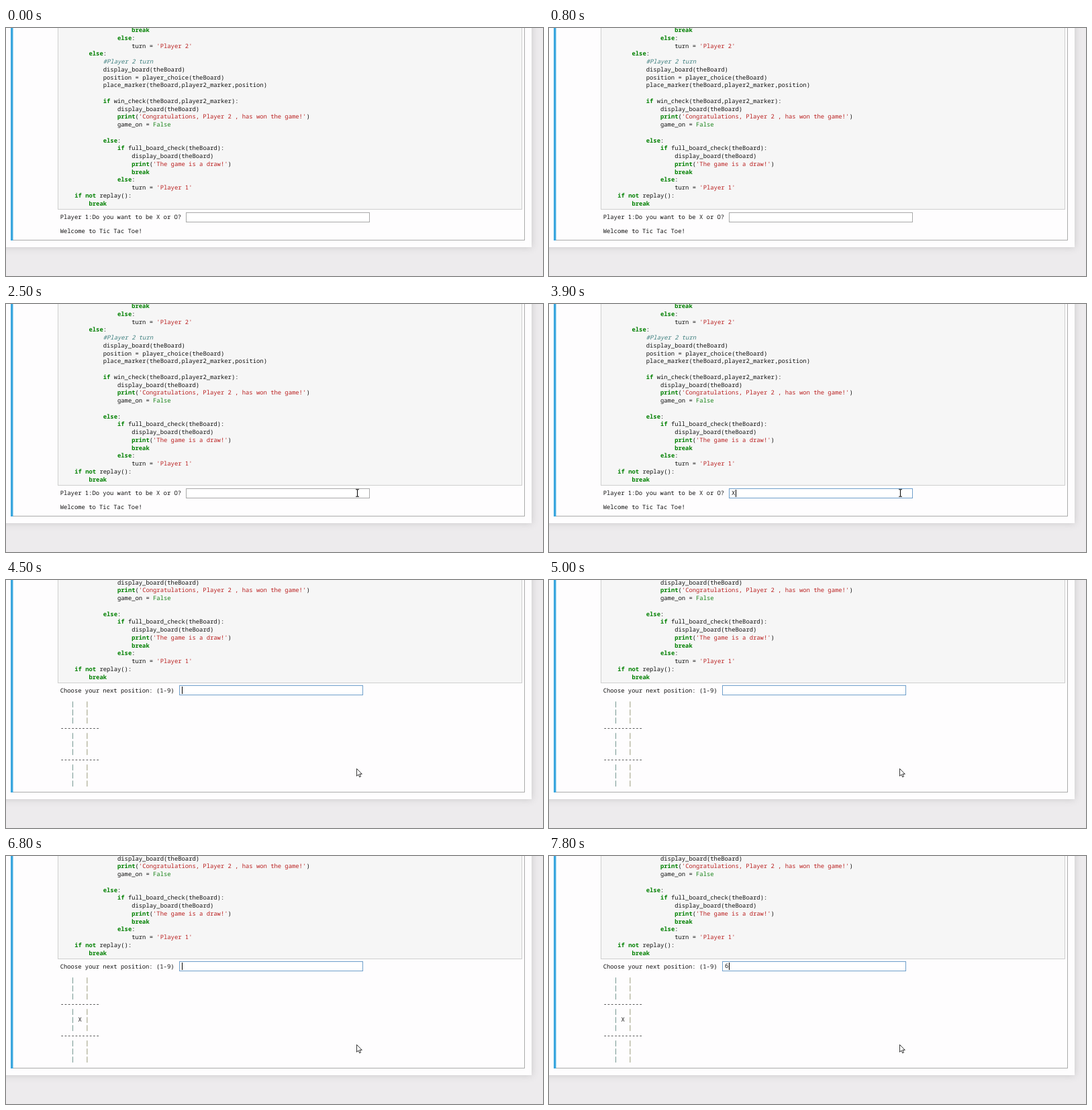
An HTML page with a canvas for the animation above (8000 ms loop, 800 by 370 pixels).

```html
<!DOCTYPE html>
<html lang="en">
<head>
<meta charset="utf-8">
<style>
html, body { margin: 0; width: 100%; height: 100%; overflow: hidden; background: #edebed; }
canvas { display: block; }
</style>
</head>
<body>
<canvas id="stage" width="800" height="370"></canvas>
<script>
const ctx = document.getElementById('stage').getContext('2d');
const LOOP = 8000, CHAR = 5.31, LINE = 11.75, SCROLL = 117;
const FONT = '8.85px "Noto Sans Mono", "DejaVu Sans Mono", monospace';

const code = `
                    break
                else:
                    turn = 'Player 2'
        else:
            #Player 2 turn
            display_board(theBoard)
            position = player_choice(theBoard)
            place_marker(theBoard,player2_marker,position)

            if win_check(theBoard,player2_marker):
                display_board(theBoard)
                print('Congratulations, Player 2 , has won the game!')
                game_on = False

            else:
                if full_board_check(theBoard):
                    display_board(theBoard)
                    print('The game is a draw!')
                    break
                else:
                    turn = 'Player 1'
    if not replay():
        break`.split('\n').slice(1);

// Pointer tip every 100 ms from 1300 ms on
const path = [[92, 182], [190, 232], [310, 258], [410, 270], [476, 273],
  [510, 276], [530, 279], [541, 281], [543, 280]];
const beamX = [537, 531, 526, 523.5];

function text(str, x, y, color = '#111', style = '') {
  ctx.font = style + ' ' + FONT;
  ctx.fillStyle = color;
  ctx.fillText(str, x, Math.round(y));
}

function tokenStyle(token) {
  if (token[0] === '#') return ['#408080', 'italic'];
  if (token[0] === "'") return ['#ba2121'];
  if (token === 'False') return ['#1c851c'];
  if (/^(if|not|else|break|print)$/.test(token)) return ['#008000', 'bold'];
  return [];
}

function codeLine(line, y) {
  for (const m of line.matchAll(/#.*|'[^']*'|\w+|[^\w\s'#]+/g))
    text(m[0], 81 + m.index * CHAR, y, ...tokenStyle(m[0]));
}

function box(x, y, w, h, fill, stroke) {
  ctx.fillStyle = fill;
  ctx.fillRect(x, y, w, h);
  ctx.strokeStyle = stroke;
  ctx.lineWidth = 1;
  ctx.strokeRect(x + .5, y + .5, w - 1, h - 1);
}

function page() {
  ctx.fillStyle = '#edebed';
  ctx.fillRect(0, 0, 800, 370);
  ctx.save();
  ctx.shadowColor = 'rgba(87,87,87,.25)';
  ctx.shadowBlur = 10;
  ctx.fillStyle = '#fefdfe';
  ctx.fillRect(-20, -20, 803, 347);
  ctx.restore();
  box(7, -5, 766, 322, '#fefdfe', '#ababab');
  ctx.fillStyle = '#3ba7de';
  ctx.fillRect(7, 0, 3.5, 317);
}

function codeCell(scroll) {
  box(77, -5, 692, 276 - scroll, '#f6f6f6', '#cfcfcf');
  code.forEach((line, i) => codeLine(line, 6 + i * LINE - scroll));
}

function input(x, y, value, focused, caret) {
  box(x, y, 274, 15, '#fff', focused ? '#6f9fcb' : '#a9a9a9');
  text(value, x + 4, y + 10);
  if (caret) {
    ctx.fillStyle = '#000';
    ctx.fillRect(x + 4 + Math.round(value.length * 6), y + 2, 1, 11);
  }
}

function board(mark) {
  for (let i = 0; i < 11; i++) {
    const y = 188.4 + i * LINE;
    if (i % 4 === 3) {
      text('-'.repeat(11), 81, y);
    } else {
      text('|', 81 + 3 * CHAR, y, '#2f665c');
      text('|', 81 + 7 * CHAR, y, '#68693a');
    }
  }
  if (mark) text('X', 81 + 5 * CHAR, 188.4 + 5 * LINE);
}

function arrow(x, y) {
  const shape = new Path2D('M0 0V11L2.5 8.7L4.2 12.5L6 11.7L4.3 8H7.8Z');
  ctx.save();
  ctx.translate(x + .5, y + .5);
  ctx.fillStyle = '#fff';
  ctx.fill(shape);
  ctx.strokeStyle = '#222';
  ctx.lineWidth = .9;
  ctx.stroke(shape);
  ctx.restore();
}

function beam(x) {
  ctx.strokeStyle = '#111';
  ctx.lineWidth = 1.1;
  ctx.stroke(new Path2D(`M${x} 277V287M${x - 2.5} 276.8h5M${x - 2.5} 287.2h5`));
}

function draw(t) {
  const step = Math.floor(t / 100);
  page();
  if (t < 4500) {
    codeCell(0);
    text('Player 1:Do you want to be X or O?', 80.7, 285);
    text('Welcome to Tic Tac Toe!', 80.7, 306);
    const caret = t >= 2600 && t < 3100 || t >= 3600;
    input(268, 275, t < 3900 ? '' : 'X', t >= 2600, caret);
    if (step >= 22) beam(beamX[Math.min(step - 22, 3)]);
    else if (step >= 13) arrow(...path[step - 13]);
  } else {
    codeCell(SCROLL);
    text('Choose your next position: (1-9)', 80.7, 168);
    const value = t >= 7800 ? '6' : t >= 5300 && t < 5800 ? '5' : '';
    const caret = !(t >= 5000 && t < 5300 || t >= 6300 && t < 6800 || t >= 7300 && t < 7800);
    input(258, 157, value, true, caret);
    board(t >= 5800);
    arrow(522, 281);
  }
}

function frame() {
  draw(performance.now() % LOOP);
  requestAnimationFrame(frame);
}
ctx.textRendering = 'geometricPrecision';
frame();
</script>
</body>
</html>
```
